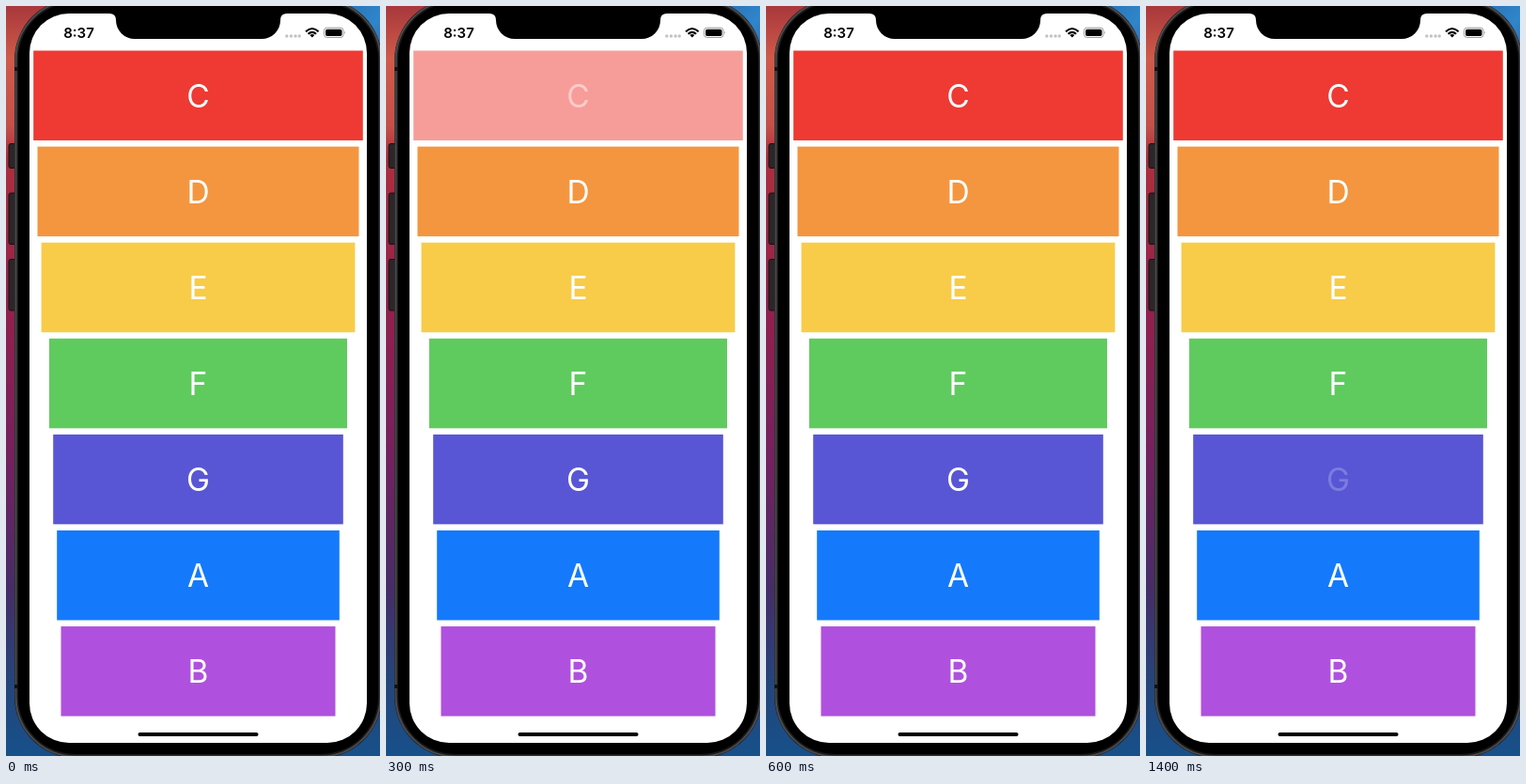
Animation of 398x798 px, one loop 1.5 s. Source, as an HTML page:

```html
<!DOCTYPE html>
<html lang="en">
<head>
<meta charset="utf-8">
<title>Xylophone keys</title>
<style>
html, body { margin: 0; width: 100%; height: 100%; overflow: hidden; background: #000; }
svg { display: block; width: 398px; height: 798px; }
text { font-family: Inter, "Liberation Sans", sans-serif; }
.key text { font-size: 33.5px; fill: #fff; text-anchor: middle; }
.time { font-size: 15px; font-weight: 600; text-anchor: middle; }

/* Each state holds for 100 ms */
#C { animation: press 1.5s step-end infinite; }
#C text { animation: label-c 1.5s step-end infinite; }
#G text { animation: label-g 1.5s step-end infinite; }
@keyframes press {
  0% { opacity: 1; }
  13.3% { opacity: .5; }
  26.6%, 100% { opacity: 1; }
}
@keyframes label-c {
  0% { opacity: 1; }
  6.6% { opacity: .2; }
  20% { opacity: .48; }
  26.6% { opacity: .8; }
  33.3%, 100% { opacity: 1; }
}
@keyframes label-g {
  0% { opacity: 1; }
  93.3%, 100% { opacity: .22; }
}
</style>
</head>
<body>
<svg viewBox="0 0 398 798">
  <defs>
    <linearGradient id="wall" x2="0" y2="1">
      <stop offset="0" stop-color="#a8383c"/>
      <stop offset=".07" stop-color="#cf5a49"/>
      <stop offset=".16" stop-color="#c4504a"/>
      <stop offset=".2" stop-color="#ae2f3c"/>
      <stop offset=".4" stop-color="#93204c"/>
      <stop offset=".6" stop-color="#74215f"/>
      <stop offset=".78" stop-color="#452d68"/>
      <stop offset=".9" stop-color="#24457a"/>
      <stop offset="1" stop-color="#17508a"/>
    </linearGradient>
    <linearGradient id="sky" x2="1" y2="1">
      <stop offset="0" stop-color="#2a6cae"/>
      <stop offset=".6" stop-color="#2f86cb"/>
      <stop offset="1" stop-color="#3b5f9c"/>
    </linearGradient>
  </defs>

  <rect width="398" height="798" fill="url(#wall)"/>
  <rect x="340" width="58" height="60" fill="url(#sky)"/>

  <g fill="#2b2628" stroke="#151214">
    <rect x="3" y="146.500" width="9" height="26" rx="2"/>
    <rect x="3" y="199" width="9" height="54.500" rx="2"/>
    <rect x="3" y="269.500" width="9" height="54.500" rx="2"/>
  </g>

  <rect x="9" y="-8" width="391" height="808" rx="65" fill="#19191a"/>
  <rect x="10.500" y="-6.500" width="388" height="805" rx="63.500" fill="none" stroke="#4b4a4c" stroke-width="2"/>
  <path d="M9 67h4M9 724h4" stroke="#111" stroke-width="4"/>
  <rect x="13" y="-4" width="383" height="800" rx="61" fill="#000"/>
  <rect x="25" y="8" width="359" height="776" rx="42" fill="#fff"/>
  <path d="M110 7V8Q117 8 117 15A20 20 0 0 0 137 35H272A20 20 0 0 0 292 15Q292 8 299 8V7Z"/>

  <text class="time" x="77.500" y="33.500">8:37</text>
  <g fill="#c3c3c6">
    <circle cx="298.800" cy="32" r="1.700"/>
    <circle cx="303.400" cy="32" r="1.700"/>
    <circle cx="308" cy="32" r="1.700"/>
    <circle cx="312.200" cy="32" r="1.700"/>
  </g>
  <g fill="none" stroke="#000" stroke-width="2.100">
    <path d="M319 27.200Q325.800 20.800 332.600 27.200"/>
    <path d="M321.500 29.800Q325.800 25.900 330.100 29.800"/>
    <path d="M323.300 31L325.800 33.600 328.300 31Q325.800 29 323.300 31Z" fill="#000" stroke="none"/>
  </g>
  <rect x="338.500" y="23.200" width="20.500" height="10.300" rx="3" fill="none" stroke="#9a9a9c"/>
  <rect x="340" y="24.700" width="17.500" height="7.300" rx="1.700"/>
  <path d="M360 26.600Q361.800 28.300 360 30Z" fill="#9a9a9c"/>

  <g id="keys"></g>
  <rect x="140.500" y="773" width="128" height="4" rx="2"/>
</svg>
<script>
const keys = [
  ["C", 29.2, "#ee3a33"],
  ["D", 33.5, "#f4963f"],
  ["E", 37.6, "#f8cc48"],
  ["F", 46, "#5fcb5f"],
  ["G", 50.2, "#5856d5"],
  ["A", 54.2, "#147afb"],
  ["B", 58.5, "#af51de"]
];
const mid = 204.5;

document.getElementById("keys").innerHTML = keys.map(([note, x, color], i) => {
  const y = 47.5 + i * 102.1;
  return `<g class="key" id="${note}">
    <rect x="${x}" y="${y}" width="${2 * (mid - x)}" height="95.5" fill="${color}"/>
    <text x="${mid}" y="${y + 60}">${note}</text>
  </g>`;
}).join("");
</script>
</body>
</html>
```
